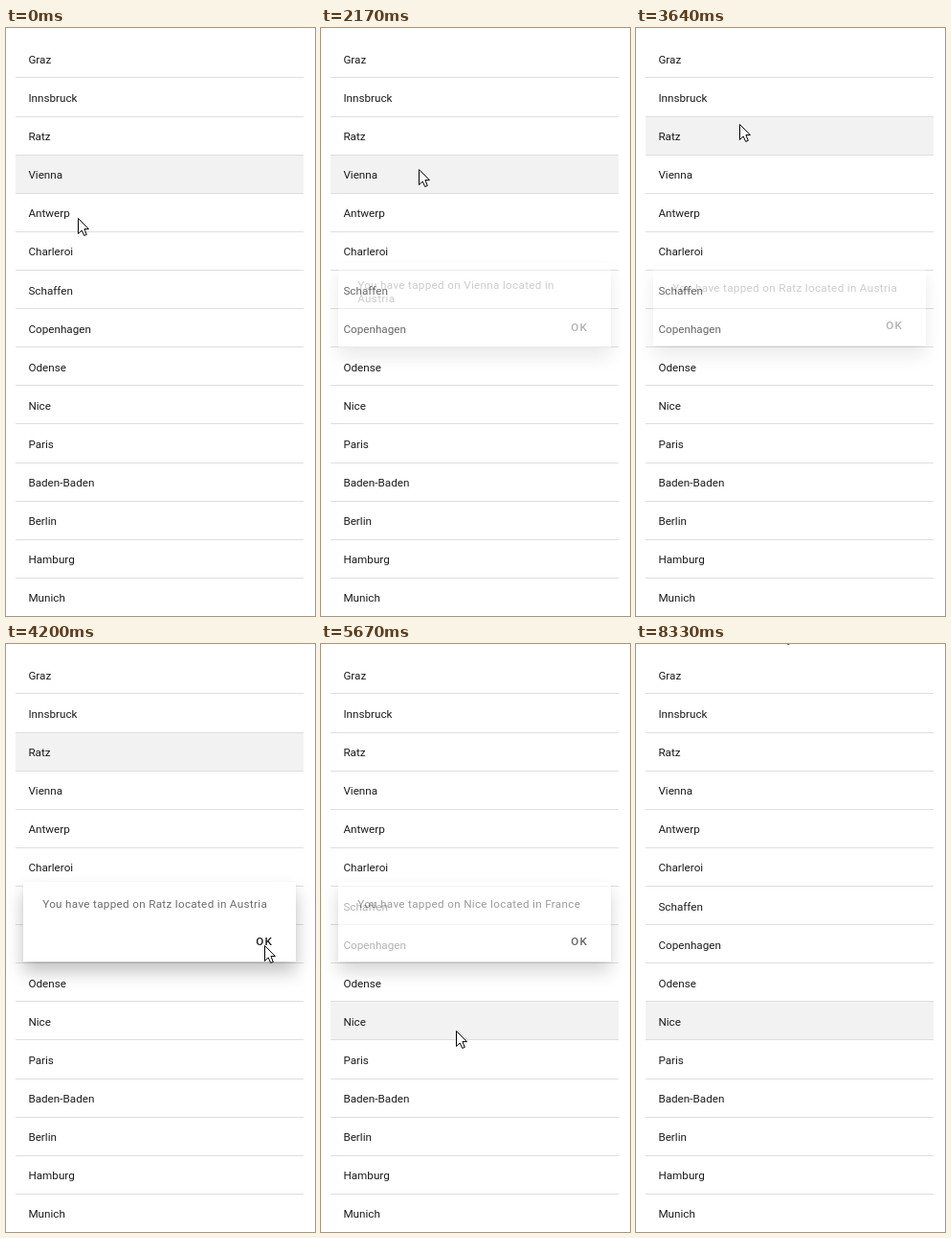
An HTML page for the animation above (8.54 s loop, 323x613 px).

```html
<!DOCTYPE html>
<html lang="en">
<head>
<meta charset="utf-8">
<title>City list</title>
<style>
  html, body { margin: 0; width: 100%; height: 100%; overflow: hidden; background: #fff; }
  svg { display: block; font: 11.7px Roboto, sans-serif; fill: #1b1b1b; }
  .line { fill: #dedede; }
  .row { fill: #f2f2f2; }
  .panel { fill: #fff; filter: drop-shadow(0 1px 2px rgba(0,0,0,.05)) drop-shadow(0 11px 9px rgba(0,0,0,.23)); }
  .body { fill: #6b6b6b; letter-spacing: .31px; }
  .ok { font-weight: 500; letter-spacing: 1.04px; }
  .arrow { fill: #fff; stroke: #000; stroke-linejoin: round; }
</style>
</head>
<body>
<svg id="stage" width="323" height="613" viewBox="0 0 323 613"></svg>
<script>
const LOOP = 8540, STEP = 70, FIRST_ROW = 3;
const cities = ['Graz', 'Innsbruck', 'Ratz', 'Vienna', 'Antwerp', 'Charleroi', 'Schaffen', 'Copenhagen',
  'Odense', 'Nice', 'Paris', 'Baden-Baden', 'Berlin', 'Hamburg', 'Munich'];

// Each visit: tap a row, its dialog opens, the pointer hits OK, the dialog closes.
const visits = [
  { row: 4, country: 'Belgium', tap: [75, 198], open: 490, hit: 1330, ok: [265, 317], close: 1400 },
  { row: 3, country: 'Austria', tap: [102, 147], open: 2170, hit: 2870, ok: [269, 313], close: 2940 },
  { row: 2, country: 'Austria', tap: [108, 100], open: 3640, hit: 4200, ok: [270, 314], close: 4620 },
  { row: 9, country: 'France', tap: [141, 403], open: 5600, hit: 6930, ok: [264, 314], close: 7000 }
];

const stage = document.getElementById('stage');
const clamp = v => Math.max(0, Math.min(1, v));
const easeOut = (p, power) => 1 - (1 - p) ** power;
const lineY = i => Math.round(51.45 + 40.11 * i);
const textY = i => Math.round(36.95 + 40.1 * i);

function add(parent, tag, attrs, text) {
  const el = document.createElementNS('http://www.w3.org/2000/svg', tag);
  for (const k in attrs) el.setAttribute(k, attrs[k]);
  if (text) el.textContent = text;
  return parent.appendChild(el);
}

function addDialog({ row, country }) {
  const intro = `You have tapped on ${cities[row]} located in`;
  const full = `${intro} ${country}`;
  const lines = full.length > 42 ? [intro, country] : [full];
  const height = 78 + 5 * lines.length + (lines.length === 1 ? 0 : 0);
  const top = Math.round(289.3 - height / 2);
  const group = add(stage, 'g', {});
  add(group, 'rect', { class: 'panel', x: 18, y: top, width: 285, height });
  lines.forEach((s, i) => add(group, 'text', { class: 'body', x: 38.2, y: top + 27.4 + 14 * i }, s));
  add(group, 'text', { class: 'ok', x: 261.3, y: top + height - 16.8 }, 'OK');
  return group;
}

const row = add(stage, 'rect', { class: 'row', x: 10, width: 301, height: 40 });
cities.forEach((name, i) => {
  add(stage, 'rect', { class: 'line', x: 10, y: lineY(i), width: 301, height: 1 });
  add(stage, 'text', { x: 23.4, y: textY(i) }, name);
});
for (const v of visits) v.dialog = addDialog(v);
const arrow = add(stage, 'path', {
  class: 'arrow',
  d: 'M.5 .5V16.5L4.2 13 6.7 18.4 9.3 17.4 6.9 11.6H11.4Z'
});

// Pointer legs: row to OK, then a quick flick to the next row; at the end out and back over the top.
const legs = visits.flatMap((v, i) => {
  const next = visits[i + 1];
  const aim = { start: v.open + 140, end: v.hit, to: v.ok, power: 2 };
  return next ? [aim, { start: v.close, end: v.close + 490, to: next.tap, power: 6 }] : [aim];
});
legs.push({ start: 7630, end: 7910, to: [300, -40], power: 1 },
          { start: 7910, end: 8330, to: [152, -18], power: 1 });

function pointer(t) {
  let pos = visits[0].tap;
  for (const { start, end, to, power } of legs) {
    const e = easeOut(clamp((t - start) / (end - start)), power);
    pos = pos.map((a, k) => a + (to[k] - a) * e);
  }
  return pos.map(Math.round);
}

function opacity({ open, close }, t) {
  const shown = clamp((t - open + STEP) / 210);
  const gone = clamp((t - close) / 180) ** 1.5;
  return t < open ? 0 : Math.min(shown, 1 - gone);
}

function draw(t) {
  const current = visits.filter(v => v.open <= t).pop();
  row.setAttribute('y', lineY((current ? current.row : FIRST_ROW) - 1) + 1);
  for (const v of visits) v.dialog.setAttribute('opacity', opacity(v, t));
  arrow.setAttribute('transform', `translate(${pointer(t)})`);
}

const start = performance.now();
function tick() {
  const t = (performance.now() - start) % LOOP;
  draw(Math.floor(t / STEP) * STEP);
  requestAnimationFrame(tick);
}
tick();
</script>
</body>
</html>
```
